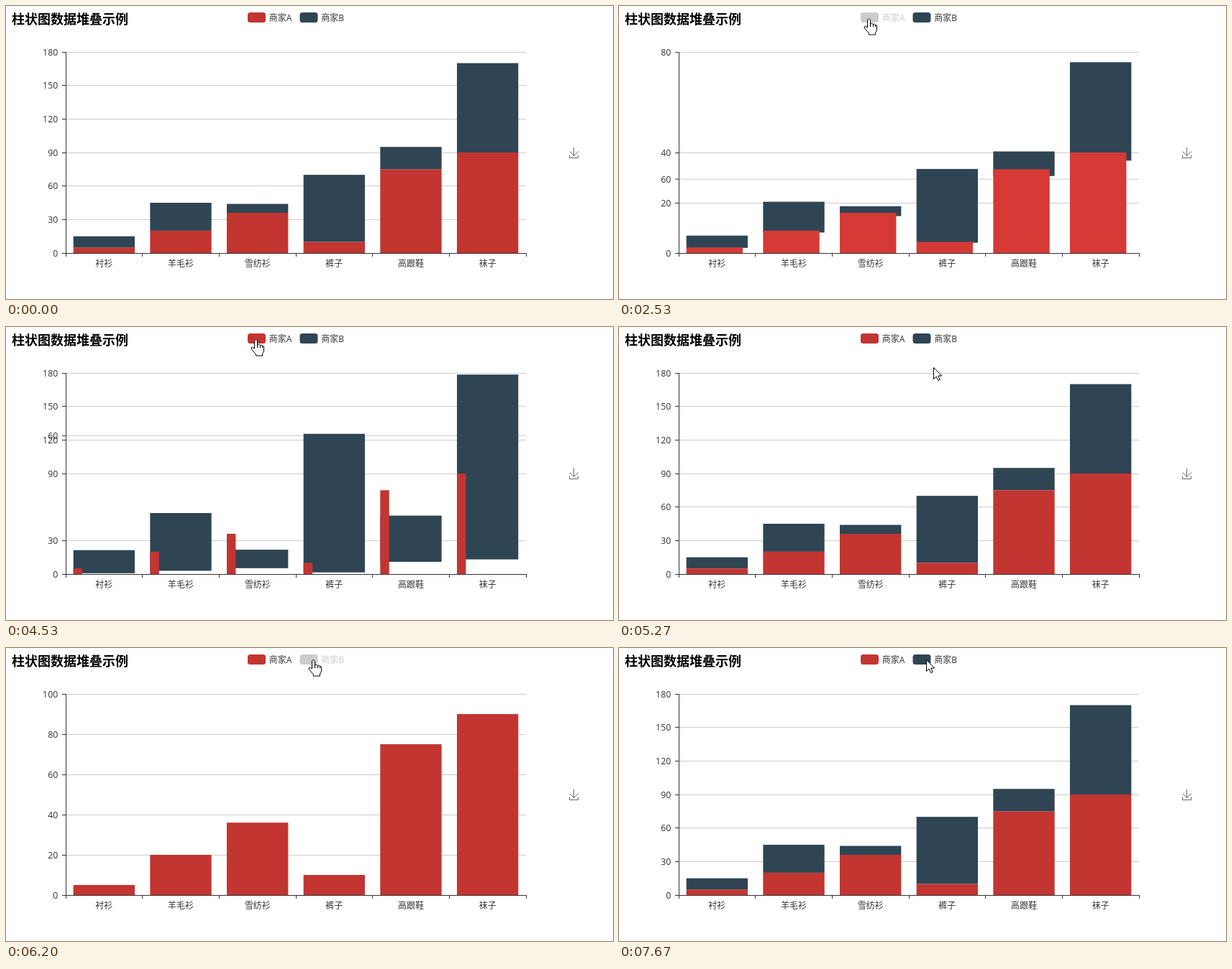
An HTML page with a canvas that plays this animation: 844 by 408 pixels, repeating every 8000 ms.

```html
<!DOCTYPE html>
<html lang="zh">
<head>
<meta charset="utf-8">
<title>柱状图数据堆叠示例</title>
<style>
html, body { margin: 0; width: 100%; height: 100%; overflow: hidden; background: #fff; }
canvas { display: block; }
</style>
</head>
<body>
<canvas id="stage" width="844" height="408"></canvas>
<script>
const ctx = document.getElementById('stage').getContext('2d');
const LOOP = 8000, STEP = 1000 / 15, DURATION = 300;
const LEFT = 83, RIGHT = 723, TOP = 64, BOTTOM = 344;
const CJK = '"Noto Sans CJK SC", "Noto Sans CJK", sans-serif';
const LATIN = '"Open Sans", ';

const names = ['衬衫', '羊毛衫', '雪纺衫', '裤子', '高跟鞋', '袜子'];
const series = [
  { name: '商家A', data: [5, 20, 36, 10, 75, 90], color: '#c23531', hot: '#d53a36', legendX: 336, hover: [1930, 4500] },
  { name: '商家B', data: [10, 25, 8, 60, 20, 80], color: '#2f4554', hot: '#344c5c', legendX: 408.5, hover: [5650, 7350] }
];
const band = (RIGHT - LEFT) / names.length;
const barWidth = band * 0.8;

// Each phase: start time, visible series, axis maximum and interval
const phases = [
  { at: -1000, on: [true, true], max: 180, gap: 30 },
  { at: 2525, on: [false, true], max: 80, gap: 20, toggled: 0 },
  { at: 4518, on: [true, true], max: 180, gap: 30, toggled: 0 },
  { at: 5890, on: [true, false], max: 100, gap: 20, toggled: 1 },
  { at: 7360, on: [true, true], max: 180, gap: 30, toggled: 1 }
];

const cursorPath = [
  [1060, 695, 398], [1533, 70, 33], [1600, 61, 25], [1867, 322, 7],
  [2200, 347, 17], [5000, 347, 17], [5267, 437, 56], [5400, 446, 58],
  [5733, 427, 16], [8000, 427, 16]
];
const arrow = new Path2D('M.5 .5V16.5L4.2 13L6.7 18.6L9.2 17.5L6.8 12H11.8Z');
const hand = new Path2D('M-2 2Q0 -1 2 2V8Q4 6 6 8.5Q8 7 9 9.5Q11.5 9 11 12V16Q11 18 9 20V23H0V21L-6 14Q-7.5 11.5 -5 11L-2 13Z');
const knuckles = new Path2D('M2 8V12M6 8.5V12M9 9.5V12');
const saveIcon = new Path2D('M783.5 202.5L789.5 208.5L796 202.5M783.5 207.5V211.5H795.5V207.5M789.5 208V197');

const lerp = (a, b, p) => a + (b - a) * p;
const easeOut = k => 1 - (1 - k) ** 3;
const snap = v => Math.floor(Math.round(v * 2) / 2) + 0.5;
const valueY = (v, phase) => BOTTOM - v / phase.max * (BOTTOM - TOP);
const between = (t, [a, b]) => t >= a && t < b;

function line(x1, y1, x2, y2, color) {
  ctx.strokeStyle = color;
  ctx.beginPath();
  ctx.moveTo(x1, y1);
  ctx.lineTo(x2, y2);
  ctx.stroke();
}

function text(str, x, y, font, color = '#333', align = 'left') {
  ctx.font = font;
  ctx.fillStyle = color;
  ctx.textAlign = align;
  ctx.fillText(str, x, y);
}

function drawAxes(prev, cur, p) {
  for (let v = 0; v <= cur.max; v += cur.gap) {
    const shared = v <= prev.max && v % prev.gap === 0;
    const end = snap(valueY(v, cur));
    const y = shared ? lerp(snap(valueY(v, prev)), end, p) : end;
    if (v) line(LEFT, y, RIGHT, y, '#ccc');
    line(LEFT - 5, y, LEFT, y, '#333');
    text(v, 72.2, y + 4.5, '12.3px ' + LATIN + CJK, '#333', 'right');
  }
  line(LEFT + 0.5, TOP, LEFT + 0.5, BOTTOM + 1, '#333');
  line(LEFT, BOTTOM + 0.5, RIGHT + 1, BOTTOM + 0.5, '#333');
  for (let i = 0; i <= names.length; i++) {
    const x = snap(LEFT + band * i);
    line(x, BOTTOM, x, BOTTOM + 5, '#333');
  }
  names.forEach((n, i) => text(n, LEFT + band * (i + 0.5), 363, '12px ' + CJK, '#333', 'center'));
}

function barSpan(s, i, phase) {
  const base = s === 1 && phase.on[0] ? series[0].data[i] : 0;
  return [valueY(base + series[s].data[i], phase), valueY(base, phase)];
}

function drawBars(s, prev, cur, p, t) {
  const was = prev.on[s], is = cur.on[s];
  const grow = was && is ? 1 : is ? p : was ? 1 - p : 0;
  if (!grow) return;
  ctx.fillStyle = between(t, series[s].hover) ? series[s].hot : series[s].color;
  names.forEach((_, i) => {
    const from = barSpan(s, i, was ? prev : cur);
    const to = barSpan(s, i, is ? cur : prev);
    const top = lerp(from[0], to[0], p), bottom = lerp(from[1], to[1], p);
    ctx.fillRect(LEFT + band * (i + 0.1), top, barWidth * grow, bottom - top);
  });
}

function drawLegend(on) {
  series.forEach((s, i) => {
    ctx.fillStyle = on[i] ? s.color : '#ccc';
    ctx.beginPath();
    ctx.roundRect(s.legendX, 9, 25, 14, 3.5);
    ctx.fill();
    text(s.name, s.legendX + 29.8, 21, '12px ' + LATIN + CJK, on[i] ? '#333' : '#ccc');
  });
}

function cursorAt(t) {
  if (between(t, [530, 599])) return [843, 407];
  const k = cursorPath.findIndex(c => c[0] > t);
  if (k < 1) return null;
  const a = cursorPath[k - 1], b = cursorPath[k];
  const p = (t - a[0]) / (b[0] - a[0]);
  return [Math.round(lerp(a[1], b[1], p)), Math.round(lerp(a[2], b[2], p))];
}

function drawCursor(t) {
  const pos = cursorAt(t);
  if (!pos) return;
  const isHand = series.some(s => between(t, s.hover)) || between(t, [4500, 5060]);
  ctx.save();
  ctx.translate(pos[0] + (isHand ? 0.5 : 0), pos[1]);
  ctx.fillStyle = '#fff';
  ctx.strokeStyle = '#000';
  ctx.fill(isHand ? hand : arrow);
  ctx.stroke(isHand ? hand : arrow);
  if (isHand) ctx.stroke(knuckles);
  ctx.restore();
}

function draw(t) {
  let k = phases.length - 1;
  while (phases[k].at > t) k--;
  const cur = phases[k], prev = phases[Math.max(0, k - 1)];
  const p = easeOut(Math.min(1, (t - cur.at) / DURATION));

  ctx.fillStyle = '#fff';
  ctx.fillRect(0, 0, 844, 408);
  ctx.lineWidth = 1;
  drawAxes(prev, cur, p);
  const last = cur.toggled ?? 1;
  drawBars(1 - last, prev, cur, p, t);
  drawBars(last, prev, cur, p, t);
  text('柱状图数据堆叠示例', 8, 25, 'bold 18px ' + CJK, '#000');
  drawLegend(cur.on);
  ctx.strokeStyle = '#666';
  ctx.stroke(saveIcon);
  drawCursor(t);
}

const start = performance.now();
function tick() {
  const t = (performance.now() - start) % LOOP;
  draw(Math.floor((t + 5) / STEP) * STEP % LOOP);
  requestAnimationFrame(tick);
}
tick();
</script>
</body>
</html>
```
